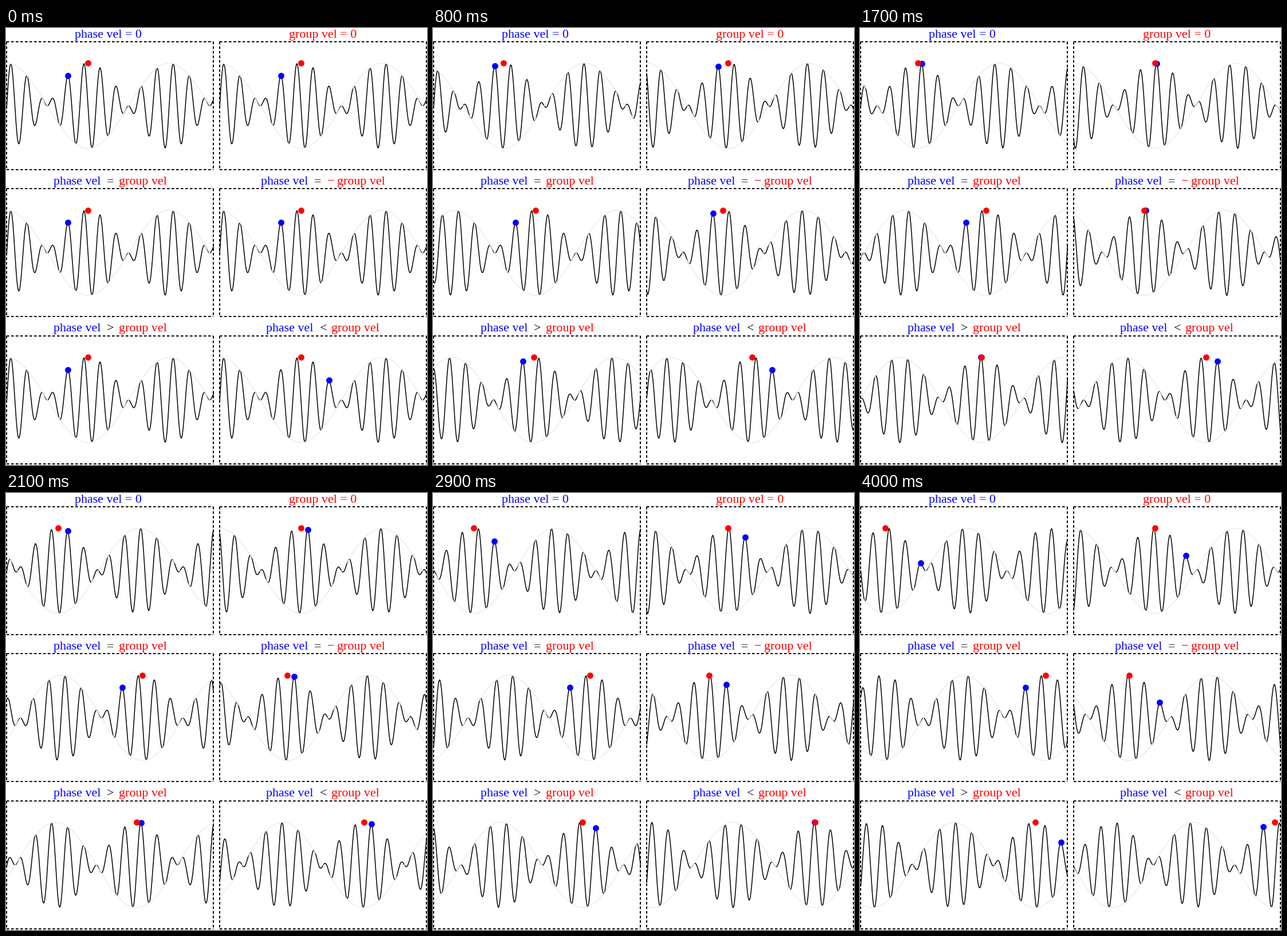
Write a matplotlib script that moves like this. It is 735 by 762 pixels and loops after 4100 ms.

```python
import numpy as np
import matplotlib.pyplot as plt
from matplotlib.animation import FuncAnimation

W, H, DPI = 735, 762, 100
PX = 72 / DPI                 # one pixel in points
FRAMES, INTERVAL = 41, 100
SCALE = 45.12                 # pixels per unit of x
AMP = 74.3
COL_STEP, ROW_STEP = 371.8, 256.5
BLUE, RED, BLACK, PALE = "#0000ff", "#ff0000", "#000000", "#def0ff"

# phase speed, group speed (units per frame), start of the marked crest / pi
PANELS = [
    (0, -0.055, 0.75),
    (0.05, 0, 0.75),
    (0.1, 0.1, 0.75),
    (0.025, -0.025, 0.75),
    (0.135, 0.09, 0.75),
    (0.116 / 1.5, 0.116, 1.35),
]

# pieces of each title: left edge, text, colour
TITLES = [
    [(119.8, "phase vel = 0", BLUE)],
    [(493.8, "group vel = 0", RED)],
    [(82.6, "phase vel", BLUE), (175.6, "=", BLACK), (196.6, "group vel", RED)],
    [(444.8, "phase vel", BLUE), (538, "=", BLACK), (560.4, "\u2212", RED),
     (578.4, "group vel", RED)],
    [(82.6, "phase vel", BLUE), (175.6, ">", BLACK), (196.6, "group vel", RED)],
    [(454.1, "phase vel", BLUE), (547.4, "<", BLACK), (568.2, "group vel", RED)],
]

plt.rcParams["font.family"] = "Liberation Serif"
fig = plt.figure(figsize=(W / DPI, H / DPI), dpi=DPI, facecolor="white")
ax = fig.add_axes([0, 0, 1, 1])
ax.set_xlim(0, W)
ax.set_ylim(H, 0)
ax.axis("off")

x = np.linspace(0, 8, 1201)
near = np.linspace(-0.1, 0.1, 801)


def envelope(x, shift):
    return np.cos(x - shift)


def wave(x, phase, group):
    return envelope(x, group) * np.sin(10 * (x - phase))


def draw_frame(left, top):
    right, bottom = left + 361, top + 223
    edges = [((left, right), (top, top)), ((left, right), (bottom, bottom)),
             ((left, left), (top, bottom)), ((right, right), (top, bottom))]
    for xs, ys in edges:
        ax.plot(xs, ys, color=BLACK, lw=2 * PX, ls=(0, (2.25, 1.75)),
                dash_capstyle="butt", zorder=4)


class Panel:
    def __init__(self, index):
        row, col = divmod(index, 2)
        self.phase_speed, self.group_speed, crest = PANELS[index]
        self.crest = crest * np.pi
        self.x0 = 1.36 + col * COL_STEP
        self.y0 = 135.7 + row * ROW_STEP
        draw_frame(1 + round(col * COL_STEP), 24 + int(row * ROW_STEP))
        for tx, text, color in TITLES[index]:
            ax.text(tx, 17 + row * 256, text, color=color,
                    fontsize=22 * PX, va="baseline")
        self.curve, = ax.plot([], [], color=BLACK, lw=1.5 * PX, zorder=1)
        self.hull, = ax.plot([], [], color=PALE, lw=1.5 * PX, zorder=2)
        self.dots = [ax.plot([], [], "o", color=c, ms=10.8 * PX, mew=0,
                             zorder=z, snap=False)[0]
                     for c, z in ((BLUE, 5), (RED, 6))]

    def place(self, artist, x, y):
        artist.set_data(self.x0 + SCALE * np.atleast_1d(x),
                        self.y0 - AMP * np.atleast_1d(y))

    def update(self, n):
        phase, group = self.phase_speed * n, self.group_speed * n
        self.place(self.curve, x, wave(x, phase, group))
        self.place(self.hull, x, envelope(x, group))
        # the blue dot rides the true local maximum beside the carrier crest
        xs = self.crest + phase + near
        ys = wave(xs, phase, group)
        top = np.argmax(ys)
        self.place(self.dots[0], xs[top], ys[top])
        self.place(self.dots[1], np.pi + group, 1)
        return [self.curve, self.hull, *self.dots]


panels = [Panel(i) for i in range(len(PANELS))]


def update(n):
    return [artist for panel in panels for artist in panel.update(n)]


anim = FuncAnimation(fig, update, frames=FRAMES, interval=INTERVAL,
                     repeat=True, repeat_delay=0, blit=False)
plt.show()
```
